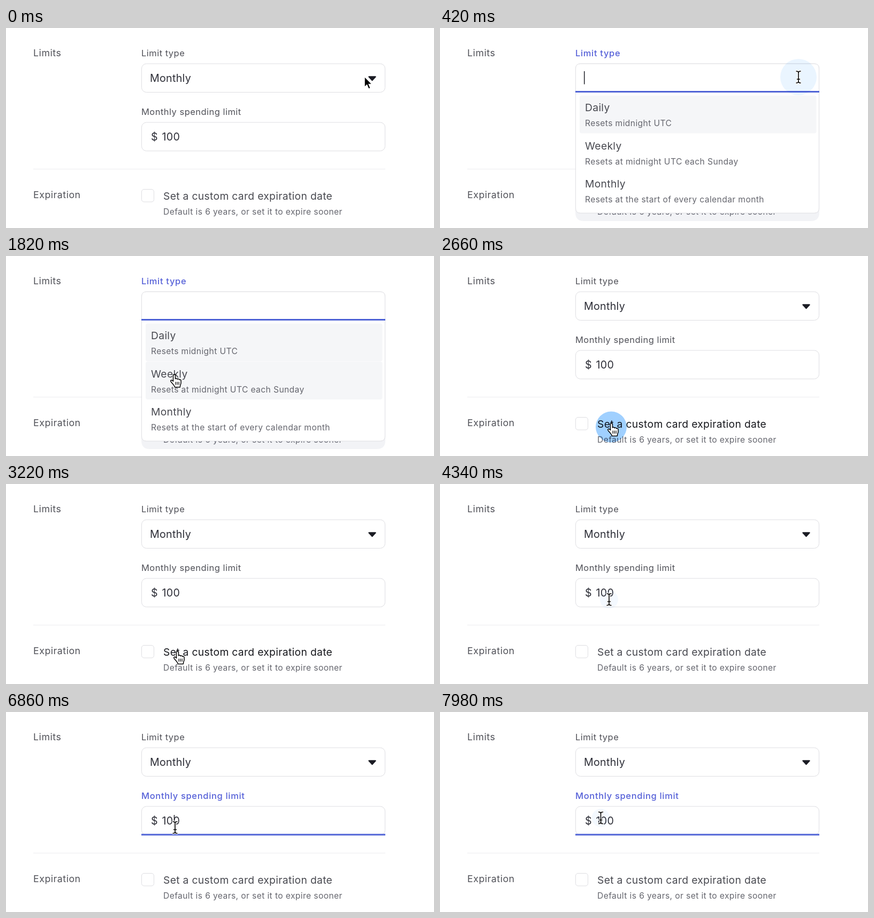
These frames come from a looping animation (800x375 px, 8000 ms). An HTML page:

```html
<!DOCTYPE html>
<html lang="en">
<head>
<meta charset="utf-8">
<title>Card limits form</title>
<style>
  html, body { margin: 0; width: 100%; height: 100%; overflow: hidden; background: #fff; }
  svg { display: block; }
  text { font-family: Inter, sans-serif; fill: #505158; white-space: pre; }
  .section { font-size: 17.7px; letter-spacing: .55px; }
  .label { font-size: 16.5px; letter-spacing: .47px; }
  .label.focus { fill: #5560d8; font-weight: 500; letter-spacing: .66px; }
  .value { font-size: 19.7px; letter-spacing: .25px; fill: #2e2f38; }
  .option { font-size: 19.3px; letter-spacing: .32px; fill: #484950; }
  .hint { font-size: 15.6px; letter-spacing: .4px; fill: #65666e; }
  .box { fill: #fff; stroke: #dedee2; }
  .caret { stroke: #22232b; stroke-width: 1.5; }
  .underline { stroke: #4f63d6; stroke-width: 3; }
  .hover { fill: #f5f6f8; }
  #ripple { mix-blend-mode: multiply; }
  #arrow { fill: #000; stroke: #fff; stroke-width: 1.5; }
  #hand { fill: #fff; stroke: #000; stroke-width: 1.5; stroke-linejoin: round; }
  #beam { fill: none; stroke-linecap: round; }
</style>
</head>
<body>
<svg width="800" height="375" viewBox="0 0 800 375">
  <defs>
    <path id="beamShape" d="M-4 -11Q0 -11 0 -8V8Q0 11 -4 11M4 -11Q0 -11 0 -8M4 11Q0 11 0 8M-2.5 4H2.5"/>
  </defs>

  <text class="section" x="51" y="53">Limits</text>
  <text class="section" x="51" y="318.5">Expiration</text>
  <path d="M51 264.5H709" stroke="#ececef"/>

  <text class="label" id="typeLabel" x="253" y="53">Limit type</text>
  <rect class="box" x="253.5" y="67" width="455" height="53.5" rx="9"/>
  <g id="typeValue">
    <text class="value" x="269" y="101">Monthly</text>
    <path d="M678.5 91.5H690.5L684.5 98Z" fill="#1b1c24" stroke="#1b1c24" stroke-width="2.4" stroke-linejoin="round"/>
  </g>

  <text class="label" id="limitLabel" x="253" y="162.5">Monthly spending limit</text>
  <rect class="box" x="253.5" y="177" width="455" height="53.5" rx="9"/>
  <text class="value" x="271" y="211">$</text>
  <text class="value" x="291.5" y="211">100</text>
  <path class="underline" id="limitLine" d="M253 230H709"/>
  <path class="caret" id="limitCaret" d="M314.5 193V216"/>

  <rect class="box" x="253.5" y="302.5" width="23" height="23.5" rx="4.5"/>
  <text class="option" id="checkText" x="294" y="322">Set a custom card expiration date</text>
  <text class="hint" x="294" y="350">Default is 6 years, or set it to expire sooner</text>

  <g id="menu">
    <path d="M253 330H709V346Q709 362 693 362H269Q253 362 253 346Z" fill="#20305a" opacity=".055"/>
    <path class="box" d="M253.5 120V76Q253.5 67 262.5 67H699.5Q708.5 67 708.5 76V338Q708.5 347 699.5 347H262.5Q253.5 347 253.5 338Z"/>
    <g id="options"></g>
    <path class="underline" d="M253 119.5H709"/>
    <path class="caret" id="menuCaret" d="M269.75 81V105.5"/>
  </g>

  <circle id="ripple"/>
  <g id="cursor">
    <path id="arrow" d="M0 0V20L4.6 15.7L7.8 23.2L11.3 21.7L8.2 14.4H14.3Z"/>
    <g id="hand" transform="translate(-6.5 -7.5)">
      <path d="M5 13.5V3C5 -.3 9 -.3 9 3V9C9 7.5 12.4 7.5 12.6 9.6C13.2 8.3 16 8.6 16.2 10.6C17 9.6 19.6 10 19.6 12V16C19.6 19 17.8 20.5 17.8 24.5H8C7.5 21 3 17.5 .6 13.8C-.6 11.5 2 10.5 3.6 12Z"/>
      <path d="M9.6 14.5V20M12.6 14.5V20M15.6 14.5V20" stroke-width="1.2"/>
    </g>
    <g id="beam">
      <use href="#beamShape" stroke="#fff" stroke-width="4"/>
      <use href="#beamShape" stroke="#000" stroke-width="1.6"/>
    </g>
  </g>
</svg>
<script>
const LOOP = 8000, STEP = 70;
const OPEN = 140, CLOSE = 2590, FOCUS = 4410;
const CLICKS = [70, 2520, 4340, 7980];

const $ = id => document.getElementById(id);
const ramp = (t, start, length) => Math.min(1, Math.max(0, (t - start) / length));
const show = (id, opacity) => $(id).setAttribute('opacity', Number(opacity));

// Rows are [time, ...values]; smooth rows ease in and out.
function track(rows, t, smooth) {
  if (t <= rows[0][0]) return rows[0].slice(1);
  const next = rows.findIndex(row => row[0] > t);
  if (next < 0) return rows.at(-1).slice(1);
  const a = rows[next - 1], b = rows[next];
  let k = (t - a[0]) / (b[0] - a[0]);
  if (smooth) k = k * k * (3 - 2 * k);
  return a.slice(1).map((v, i) => v + (b[i + 1] - v) * k);
}

const CURSOR = [
  [0, 670, 92], [840, 670, 92], [1540, 326, 163], [1680, 322, 178],
  [1820, 314, 229], [1960, 314, 240], [2380, 320, 320.5], [3360, 320, 320.5],
  [3780, 316, 216.5], [7280, 316, 216.5], [7910, 300.5, 198.5]
];
const RIPPLE = [[0, 17, .12], [70, 24, .6], [140, 29, 1], [210, 32, .7], [350, 34, .22], [630, 35, 0]];

const OPTIONS = [
  ['Daily', 'Resets midnight UTC'],
  ['Weekly', 'Resets at midnight UTC each Sunday'],
  ['Monthly', 'Resets at the start of every calendar month']
];
$('options').innerHTML = OPTIONS.map(([name, hint], i) => `
  <g transform="translate(0 ${i * 71.5})">
    <rect class="hover" id="hover${i}" x="261" y="126.5" width="442.5" height="71" rx="4"/>
    <text class="option" x="271" y="156">${name}</text>
    <text class="hint" x="271" y="184">${hint}</text>
  </g>`).join('');

function cursorKind(t, y, open) {
  if (t < OPEN) return 'arrow';
  if (open) return y < 121 ? 'beam' : 'hand';
  if (y > 298) return 'hand';
  return y > 177 && y < 231 ? 'beam' : 'arrow';
}

const blink = (t, start) => t >= start && (t - start) % 1050 < 525;

function draw(t) {
  const open = t >= OPEN && t < CLOSE;
  const focused = t >= FOCUS;
  const [x, y] = track(CURSOR, t, true);
  const kind = cursorKind(t, y, open);

  show('menu', open ? ramp(t, OPEN - 70, 140) : 0);
  show('typeValue', !open);
  show('menuCaret', blink(t, OPEN));
  $('typeLabel').classList.toggle('focus', open);
  show('hover0', 1 - ramp(t, 1820, 210));
  show('hover1', ramp(t, 1680, 140) - ramp(t, 2170, 210));
  show('hover2', ramp(t, 2170, 140));

  show('limitLine', ramp(t, FOCUS - 70, 140));
  show('limitCaret', focused && blink(t, 4280));
  $('limitLabel').classList.toggle('focus', focused);
  $('checkText').style.fill = !open && kind === 'hand' ? '#17181d' : '';

  $('cursor').setAttribute('transform', `translate(${x} ${kind === 'arrow' ? y - 1 : y})`);
  for (const id of ['arrow', 'hand', 'beam']) show(id, id === kind);

  const click = CLICKS.findLast(time => time <= t);
  const [radius, strength] = click === undefined ? [0, 0] : track(RIPPLE, t - click);
  const ripple = $('ripple');
  ripple.setAttribute('cx', x);
  ripple.setAttribute('cy', y);
  ripple.setAttribute('r', radius);
  ripple.setAttribute('fill', `rgb(${255 - 95 * strength} ${255 - 47 * strength} 255)`);
}

function tick() {
  const t = performance.now() % LOOP;
  draw(Math.floor(t / STEP) * STEP);
  requestAnimationFrame(tick);
}
tick();
</script>
</body>
</html>
```
